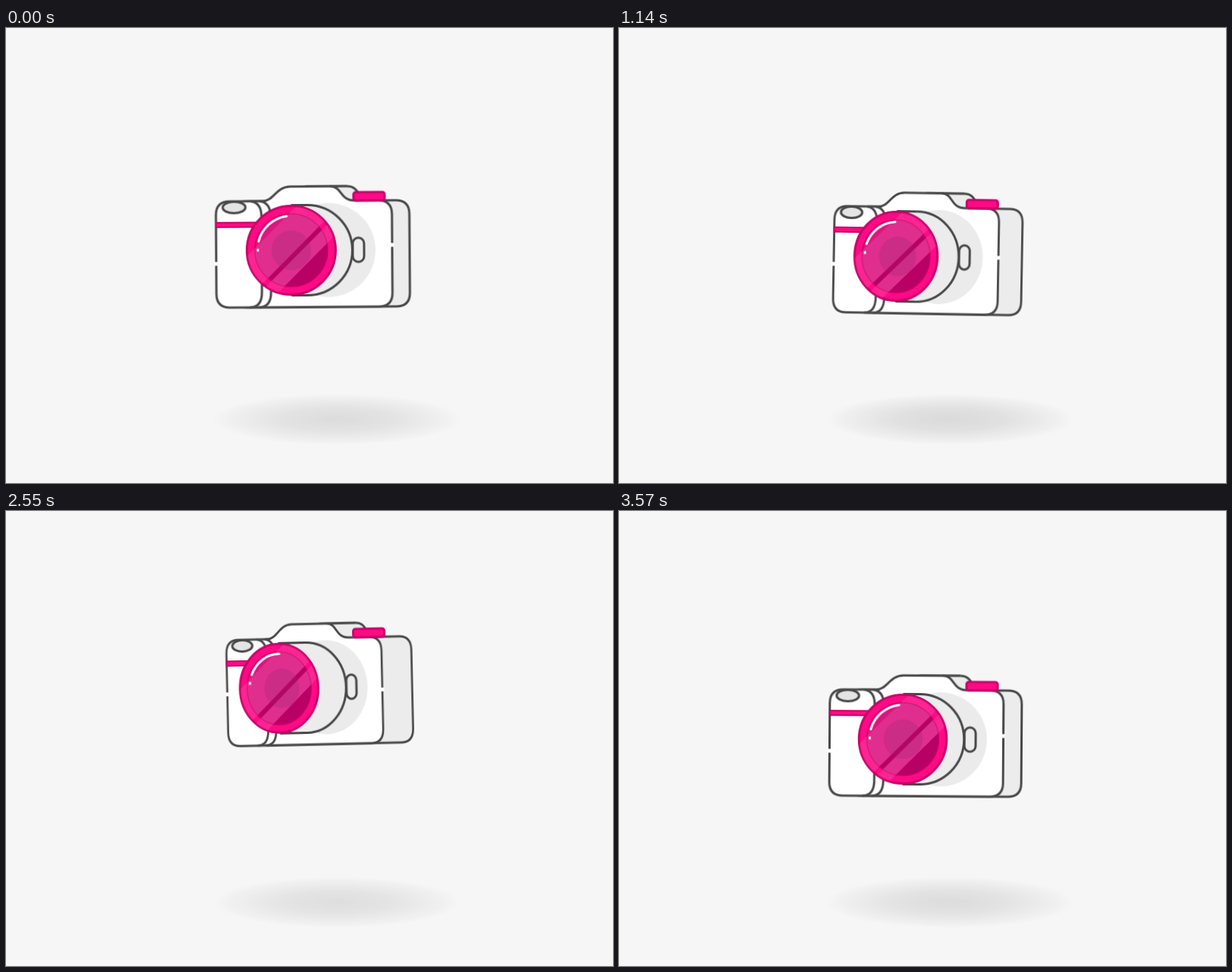
An HTML page without scripts for the animation above (3600 ms loop, 800 by 600 pixels).

```html
<!DOCTYPE html>
<html lang="en">
<head>
<meta charset="utf-8">
<title>Camera</title>
<style>
@property --w { syntax: '<number>'; inherits: true; initial-value: 1 }
@property --d { syntax: '<number>'; inherits: true; initial-value: 23 }
@property --l { syntax: '<number>'; inherits: true; initial-value: 21 }
@property --b { syntax: '<number>'; inherits: true; initial-value: 4 }

html, body { margin: 0; width: 100%; height: 100%; overflow: hidden; background: #f6f6f6 }
svg { display: block; width: 800px; height: 600px }

/* --w: face width, --d: body depth, --l: barrel length, --b: barrel base */
#cam { animation: pose 3.6s ease-in-out infinite; stroke: #484848; stroke-width: 3; fill: none }
#cam * { vector-effect: non-scaling-stroke }
@keyframes pose {
  0%, 100% { transform: translate(393px, 298px) rotate(-.4deg); --w: 1; --d: 23; --l: 21; --b: 4 }
  20% { transform: translate(392px, 311px) rotate(2deg); --w: .853; --d: 41; --l: 35; --b: -5 }
  31.67% { transform: translate(391.5px, 306.5px) rotate(1deg); --w: .935; --d: 31; --l: 27; --b: .5 }
  45.83% { transform: translate(384px, 313px) rotate(10deg); --w: .69; --d: 69; --l: 72; --b: 1 }
  60.83% { transform: translate(374.5px, 345px) rotate(34.5deg); --w: .56; --d: 83; --l: 86; --b: 2.5 }
  75% { transform: translate(398px, 215px) rotate(-9deg); --w: .95; --d: 30; --l: 25; --b: 2 }
  80.83% { transform: translate(396px, 257px) rotate(-6deg); --w: .924; --d: 33; --l: 28; --b: .5 }
  87.5% { transform: translate(392px, 314px) rotate(2deg); --w: .96; --d: 28; --l: 23; --b: 2 }
  99.17% { transform: translate(392px, 306px) rotate(.4deg); --w: .987; --d: 24; --l: 22; --b: 4 }
}
.back { transform: translateX(calc(var(--d) * 1px)) scaleX(var(--w)) }
.ridge { transform: translateX(calc(34px * var(--w))) scaleX(var(--d)) }
.face { transform: scaleX(var(--w)) }
.base { transform: translate(calc(var(--b) * 1px), -5px) scaleX(var(--w)) }
.tube { transform: translate(calc((var(--b) - var(--l)) * 1px), -5px) scaleX(var(--l)) }
.lens { transform: translate(calc((var(--b) - var(--l)) * 1px), -5px) scaleX(var(--w)) }
.flat { transform: scaleX(calc(1 / var(--w))) }
.deep { transform: translateX(calc((1 - var(--w)) * 35px)) }
.shine { transform: rotate(calc((1 - var(--w)) * 75deg)) }
.gapR { transform: translateY(min(13px, (.87 - var(--w)) * 90px)) }
.gapL { transform: translateY(max(-13px, (var(--w) - .87) * 90px)) }
.side { fill: #ececec }
.pink { fill: #ff0a85; stroke: #c9006b }
.none { stroke: none }

#shadow { animation: shade 3.6s ease-in-out infinite }
@keyframes shade {
  0%, 100% { opacity: .5 }
  20%, 31.67% { opacity: .55 }
  45.83% { opacity: .65 }
  60.83% { opacity: 1 }
  75% { opacity: .35 }
  80.83% { opacity: .42 }
  90% { opacity: .55 }
}

.flash { opacity: 0; animation: flash 3.6s linear infinite }
@keyframes flash {
  0%, 9.2% { opacity: 0 }
  10% { opacity: .85 }
  23.33%, 100% { opacity: 0 }
}
.rays { stroke: #ff0080; stroke-width: 3; animation: ray 3.6s linear infinite }
@keyframes ray {
  0%, 10% { stroke-dasharray: 0 200; stroke-dashoffset: 0; opacity: 0 }
  10.1% { opacity: 1 }
  14% { stroke-dasharray: 70 200; stroke-dashoffset: -15 }
  15% { stroke-dasharray: 55 200; stroke-dashoffset: -45 }
  16.67% { stroke-dasharray: 14 200; stroke-dashoffset: -86; opacity: 1 }
  17.4%, 100% { stroke-dasharray: 0 200; stroke-dashoffset: -100; opacity: 0 }
}
.bits circle { fill: #ff2b95; animation: fly 3.6s infinite, shrink 3.6s infinite }
@keyframes fly {
  0%, 10.8% { translate: 0 0; animation-timing-function: cubic-bezier(.2, .6, .4, 1) }
  23%, 100% { translate: var(--x) var(--y) }
}
@keyframes shrink {
  0%, 10.7% { scale: 0 }
  10.8% { scale: 1; animation-timing-function: cubic-bezier(.6, 0, 1, 1) }
  23%, 100% { scale: 0 }
}
.second, .second circle { animation-delay: -2.55s }

#streak { animation: streak 3.6s linear infinite; stroke: #484848; stroke-width: 3 }
@keyframes streak {
  0%, 77.4% { stroke-dasharray: 0 200; stroke-dashoffset: 0; opacity: 0 }
  77.5% { opacity: 1 }
  79.2% { stroke-dasharray: 65 200; stroke-dashoffset: -35 }
  80.83% { stroke-dasharray: 27 200; stroke-dashoffset: -73; opacity: 1 }
  81.7%, 100% { stroke-dasharray: 0 200; stroke-dashoffset: -100; opacity: 0 }
}
</style>
</head>
<body>
<svg viewBox="0 0 800 600">
  <defs>
    <radialGradient id="soft">
      <stop offset="0" stop-opacity=".21"/>
      <stop offset=".45" stop-opacity=".15"/>
      <stop offset=".85" stop-opacity=".05"/>
      <stop offset="1" stop-opacity="0"/>
    </radialGradient>
    <clipPath id="rim"><circle r="58"/></clipPath>
    <clipPath id="glass"><circle r="48"/></clipPath>
    <path id="body" d="M-98-70H-54C-40-70-36-89-18-89H34C52-89 46-70 68-70H98Q116-70 116-52V52Q116 70 98 70H-98Q-116 70-116 52V-52Q-116-70-98-70Z"/>
    <path id="grip" d="M-70-70Q-56-68-56-50V50Q-56 70-72 70"/>
    <line id="ray" x1="200" x2="383" pathLength="100"/>
    <g id="star">
      <use href="#ray" transform="rotate(30)"/>
      <use href="#ray" transform="rotate(90)"/>
      <use href="#ray" transform="rotate(150)"/>
      <use href="#ray" transform="rotate(210)"/>
      <use href="#ray" transform="rotate(270)"/>
      <use href="#ray" transform="rotate(330)"/>
    </g>
  </defs>

  <ellipse id="shadow" cx="436" cy="516" rx="165" ry="34" fill="url(#soft)"/>

  <g class="bits" transform="translate(400 290)">
    <circle r="6" style="--x:-238px;--y:-42px"/>
    <circle r="3.5" style="--x:-166px;--y:-16px"/>
    <circle r="3" style="--x:94px;--y:111px"/>
  </g>
  <g class="bits second" transform="translate(400 290)">
    <circle r="3.5" style="--x:-97px;--y:-122px"/>
    <circle r="5.5" style="--x:206px;--y:-84px"/>
  </g>

  <g id="cam">
    <use href="#body" class="back side"/>
    <rect class="ridge side none" y="-89" width="1" height="43"/>
    <path class="ridge" d="M0-89H1"/>

    <g class="face">
      <use href="#body" fill="#fff"/>
      <circle class="none" cx="32" cy="-5" r="62" fill="#ebebeb"/>
      <use href="#grip"/>
      <use href="#grip" x="12"/>
      <rect class="pink" x="-116" y="-42" width="59" height="6" stroke-width="2"/>
      <ellipse cx="-92" cy="-62" rx="15" ry="7.5" fill="#e4e4e4"/>
      <path class="gapL" d="M-116-2v5" stroke="#fff" stroke-width="5"/>
      <path class="gapR" d="M116-2v5" stroke="#fff" stroke-width="5"/>
    </g>
    <rect class="pink" x="65.5" y="-81" width="41" height="11" rx="3"/>

    <g class="base side">
      <rect x="60" y="-16" width="15" height="32" rx="7.5"/>
      <circle r="59.5"/>
    </g>
    <rect class="tube side none" y="-59.5" width="1" height="119"/>
    <path class="tube" d="M0-59.5H1M0 59.5H1"/>

    <g class="lens">
      <circle class="pink" r="58.5"/>
      <g clip-path="url(#glass)" class="none">
        <circle r="48" fill="#dc1580"/>
        <g class="flat"><g transform="rotate(45)" fill="#b90064">
          <rect x="4" y="-70" width="6" height="140"/>
          <rect x="27" y="-70" width="40" height="140"/>
        </g></g>
        <circle class="deep" r="26" fill="#a81068" opacity=".45"/>
      </g>
      <circle r="48" stroke="#c9006b" stroke-width="1.5"/>
      <g clip-path="url(#rim)" class="none">
        <g class="flat"><g transform="rotate(45)" fill="#fff" opacity=".11">
          <rect x="-36" y="-70" width="40" height="140"/>
          <rect x="10" y="-70" width="17" height="140"/>
        </g></g>
      </g>
      <g class="shine" stroke="#fff" stroke-linecap="round">
        <path d="M-43-12A45 45 0 0 1-6-45"/>
        <path d="M-44-1v1"/>
      </g>
    </g>
  </g>

  <line id="streak" x1="446" y1="70" x2="446" y2="130" pathLength="100"/>

  <rect class="flash" width="800" height="600" fill="#fff"/>
  <rect class="flash second" width="800" height="600" fill="#fff"/>

  <use href="#star" class="rays" transform="translate(400 290)"/>
  <use href="#star" class="rays second" transform="translate(400 290)"/>
</svg>
</body>
</html>
```
